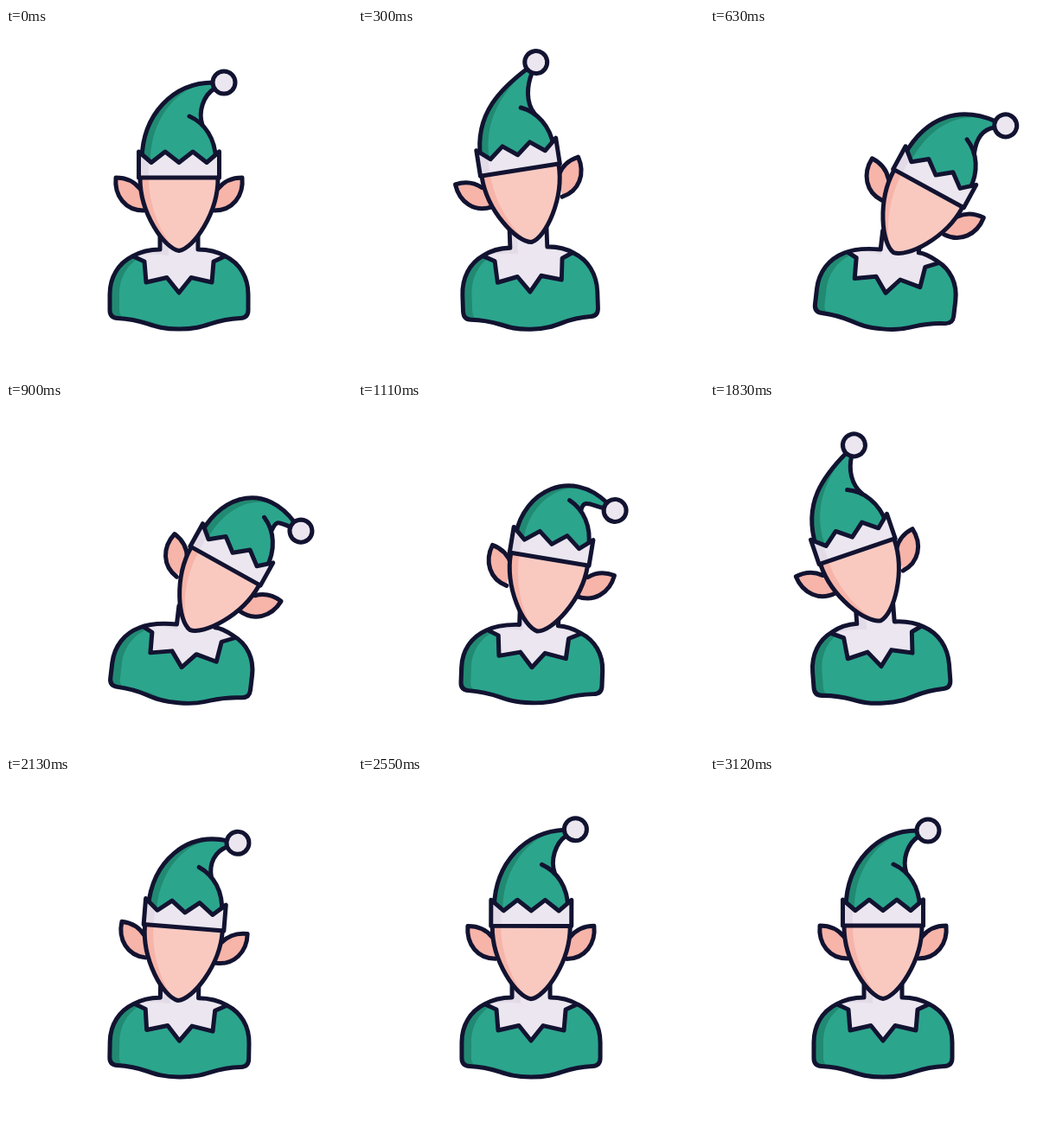
Recreate the animation shown at these times as an HTML page. Size 400 by 400 pixels, loop 5.63 s.

```html
<!DOCTYPE html>
<html lang="en">
<head>
<meta charset="utf-8">
<title>Elf</title>
<style>
  html, body { margin: 0; width: 100%; height: 100%; overflow: hidden; background: #fff; }
  svg { display: block; width: 100%; height: 100%; }
  .line { fill: none; stroke: #121331; stroke-width: 5; stroke-linecap: round; stroke-linejoin: round; }
  .green { fill: #2ca58d; }
  .moss { fill: #218a72; }
  .white { fill: #ebe6ef; }
  .grey { fill: #e3dce8; }
  .skin { fill: #f9c9c0; }
  .blush { fill: #f7b4a9; }
</style>
</head>
<body>
<svg viewBox="0 0 400 400">
  <defs>
    <path id="coat"/>
    <clipPath id="coatClip"><use href="#coat"/></clipPath>
    <path id="ear" d="M-45 12C-52 3 -62 -1 -73 -1C-75 20 -62 37 -41 37"/>
    <path id="face" d="M-45 0C-45 40 -17 81 0 83.500C17 81 45 40 45 0"/>
    <path id="band" d="M-46.500 -31L-32 -18.500L-16 -31L0 -18.500L16 -31L32 -18.500L46.500 -31V-1H-46.500Z"/>
  </defs>
  <g id="body">
    <g clip-path="url(#coatClip)">
      <use href="#coat" class="moss"/>
      <use href="#coat" class="green" x="11"/>
      <g id="collar">
        <path class="white" d="M130 200V256L160 270L162 294L186 288.500L200 306L214 288.500L238 294L240 270L270 256V200Z"/>
        <path class="grey" d="M130 230V256L147 264Q168 260 188 263V230Z"/>
        <path class="line" d="M130 256L160 270L162 294L186 288.500L200 306L214 288.500L238 294L240 270L270 256"/>
      </g>
    </g>
    <use href="#coat" class="line"/>
  </g>
  <g id="head">
    <g id="earL"><use href="#ear" class="line blush" style="fill:#f7b4a9"/></g>
    <g id="earR"><use href="#ear" class="line blush" style="fill:#f7b4a9" transform="scale(-1 1)"/></g>
    <use href="#face" class="blush"/>
    <path class="skin" d="M-35 0C-35 40 -12 80 0 83.500C17 81 45 40 45 0Z"/>
    <use href="#face" class="line"/>
    <path id="hatShade" class="moss"/>
    <path id="hat" class="green"/>
    <path id="hatLine" class="line"/>
    <path class="line" d="M12 -72C30 -64 42 -46 42.500 -22"/>
    <use href="#band" class="white"/>
    <path class="grey" d="M-46.500 -31L-35 -21V-1H-46.500Z"/>
    <use href="#band" class="line"/>
    <circle id="pompom" class="line" style="fill:#ebe6ef" r="13"/>
  </g>
</svg>
<script>
const LOOP = 5630, STEP = 30;

// Eases in and out between [time in ms, value] turning points.
const swing = (...keys) => t => {
  const i = keys.findIndex(([time]) => time > t);
  if (i < 0) return keys[keys.length - 1][1];
  const [t0, v0] = keys[i - 1], [t1, v1] = keys[i];
  const u = (t - t0) / (t1 - t0);
  return v0 + (v1 - v0) * u * u * (3 - 2 * u);
};

const tiltAt = swing([0, 0], [280, -9.2], [740, 35], [1570, -26], [1680, -26], [2160, 5], [2600, 0]);
const swayAt = swing([0, 0], [280, 0.5], [740, 14], [1600, -3], [2600, 0]);
const stretchAt = swing([0, 0], [300, 1], [760, -0.5], [1110, -0.75], [1620, 0.95], [2100, -0.2], [2700, 0]);
const curlAt = swing([0, 0], [300, -28], [1110, 35], [1780, -28], [2180, 9], [2650, -4], [3120, 0]);

const set = (id, attrs) => {
  for (const name in attrs) document.getElementById(id).setAttribute(name, attrs[name]);
};

// The tip droops as it curls and is pulled in when the head leans.
function drawHat(curl, tilt) {
  const pull = Math.abs(tilt) / 28;
  const x = 52 + 0.45 * curl - 6 * pull;
  const y = -111 + 0.75 * curl + 0.011 * curl * curl + 7 * pull;
  const a = curl * Math.PI / 180, c = Math.cos(a), s = Math.sin(a);
  const at = (dx, dy) => [x + dx * c - dy * s, y + dx * s + dy * c];
  const end = at(-12, 0), crown = at(-59 - 0.35 * curl, 0);

  const left = inset => `M${inset - 43} -22C${inset - 42} ${inset / 2 - 74} `
    + `${crown[0] + inset / 2} ${crown[1] + inset / 5} ${end}`;
  const right = `${at(-11, 7)}C${at(-24, 15)} ${22 + 0.15 * curl} -77 27 -62`;
  const fill = inset => `${left(inset)}L${right}C36 -54 42 -42 42.500 -22Z`;
  set('hatShade', { d: fill(0) });
  set('hat', { d: fill(10) });
  set('hatLine', { d: `${left(0)}M${right}` });
  set('pompom', { cx: x, cy: y });
}

function drawBody(tilt, sway, stretch) {
  const neck = 0.8 * sway;
  set('coat', {
    d: `M${178 + neck} 234V256Q160 256 146 264C130 272 120 288 120 308V326Q120 335 129 335.500`
      + `C165 337 165 348 200 348C235 348 235 337 271 335.500Q280 335 280 326V308`
      + `C280 288 270 272 254 264Q240 256 ${222 + neck} 256V234`
  });
  set('body', {
    transform: `translate(200 340) rotate(${0.17 * tilt}) skewX(${-0.06 * tilt}) `
      + `scale(${1 - 0.025 * stretch} ${1 + 0.03 * stretch}) translate(-200 -340)`
  });
  set('collar', { transform: `rotate(${0.1 * tilt} 200 290)` });
}

function draw(t) {
  const tilt = tiltAt(t), sway = swayAt(t), stretch = stretchAt(t), curl = curlAt(t);
  drawBody(tilt, sway, stretch);
  drawHat(curl, tilt);
  set('head', {
    transform: `translate(${200 + sway} ${257.5 - 10 * stretch}) rotate(${tilt}) translate(0 -83.5)`
  });
  set('earL', { transform: `rotate(${0.33 * curl} -44 24)` });
  set('earR', { transform: `rotate(${0.33 * curl} 44 24)` });
}

function frame() {
  const t = performance.now() % LOOP;
  draw(Math.floor(t / STEP) * STEP);
  requestAnimationFrame(frame);
}
frame();
</script>
</body>
</html>
```
